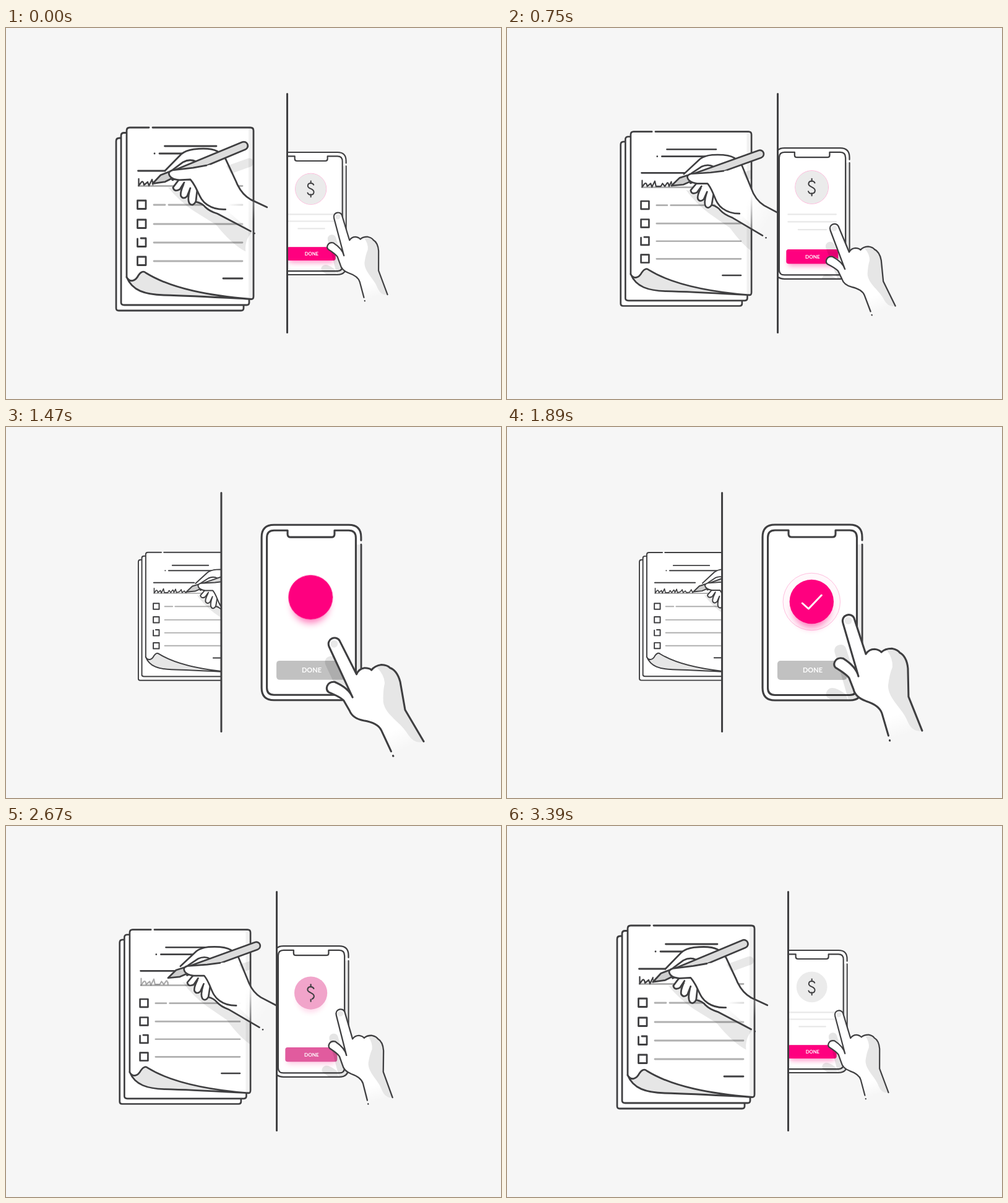
Recreate the animation shown at these times as an HTML page. Size 800x600 px, loop 3420 ms.

```html
<!DOCTYPE html>
<html lang="en">
<head>
<meta charset="utf-8">
<title>Paper form and mobile form</title>
<style>
  html, body { margin: 0; width: 100%; height: 100%; overflow: hidden; background: #f6f6f6; }
  svg { display: block; width: 800px; height: 600px; }
  .ink { fill: none; stroke: #3f3f41; stroke-width: 2.8; stroke-linecap: round; stroke-linejoin: round; }
  .white { fill: #fff; }
  .rule { fill: none; stroke: #b0b0b0; stroke-width: 2.8; stroke-linecap: round; }
  .pale { fill: none; stroke: #e8e8e8; stroke-width: 3; stroke-linecap: round; }
  .shade { fill: #e6e6e6; }
  .pink { fill: #ff007f; }
</style>
</head>
<body>
<svg viewBox="0 0 800 600">
  <defs>
    <clipPath id="leftSide"><rect id="leftRect" width="450" height="600"/></clipPath>
    <clipPath id="rightSide"><rect id="rightRect" width="800" height="600"/></clipPath>
    <clipPath id="pageClip"><rect x="195" y="161" width="205" height="278"/></clipPath>
    <clipPath id="phoneClip"><rect x="413" y="158" width="161" height="284" rx="20"/></clipPath>
    <clipPath id="writtenClip"><rect id="written" x="205" y="230" height="40"/></clipPath>
    <linearGradient id="armFade" gradientUnits="userSpaceOnUse" x1="362" y1="280" x2="404" y2="304">
      <stop offset="0" stop-color="#fff"/><stop offset="1" stop-color="#fff" stop-opacity="0"/>
    </linearGradient>
    <linearGradient id="wristFade" gradientUnits="userSpaceOnUse" x1="630" y1="465" x2="641" y2="498">
      <stop offset="0" stop-color="#fff"/><stop offset="1" stop-color="#fff" stop-opacity="0"/>
    </linearGradient>
    <filter id="blur" x="-50%" y="-100%" width="200%" height="300%"><feGaussianBlur stdDeviation="6"/></filter>
    <path id="handShape" d="M568 403 L543 317 C539 303 557 299 561 309 L580 367 Q585 359 594 359 Q602 360 605 364 Q611 358 622 358
      Q632 360 635 365 Q646 371 648 390 L649 436 L671 491 L618 507 L606 463 Q602 450 580 443 Q563 437 560 424 L553 406
      Q549 400 531 389 Q527 385 530 379 Q534 372 543 374 Q552 377 561 384Z"/>
  </defs>

  <g clip-path="url(#leftSide)"><g id="paper">
    <path class="ink white" d="M384 449 V453 Q384 457 380 457 H182 Q178 457 178 453 V183 Q178 178 183 178 H188"/>
    <path class="ink white" d="M393 439 V444 Q393 448 389 448 H191 Q186 448 186 444 V174 Q186 169.500 191 169.500 H195"/>
    <path class="white" d="M195 403 V166 Q195 161 200 161 H395 Q400 161 400 166 V438.500 Q270 436 220 393Z"/>
    <path fill="#f1f1f1" d="M392 162 H396 Q400 162 400 166 V437 H392Z"/>
    <path class="ink" d="M231 161 H200 Q195 161 195 166 V403 M237 161 H395 Q400 161 400 166 V434 Q400 439 396 438.500"/>
    <path class="ink shade" d="M195 403 C200 412 209 410 214 400 Q220 391 226 396 C268 422 330 433 396 438.500
      C350 436 300 433 255 432 C225 431 204 425 195 403Z"/>
    <path class="ink" d="M256.500 191 H340 M240 203 h.1 M248 203 H357 M213.500 231 H307 M351 405 H382"/>
    <path class="rule" d="M214 255.500 H382 M239 286 H257 M263 286 H382 M239 317 H382 M239 347 H382 M239 377 H382"/>
    <path class="ink" stroke-linejoin="miter" d="M212.500 279 h13.500 v13.500 h-13.500z M212.500 310 h13.500 v13.500 h-13.500z
      M218 340 H226 V353.500 H212.500 V341 M212.500 370 h13.500 v13.500 h-13.500z"/>
    <g clip-path="url(#writtenClip)"><path id="signature" class="ink" style="stroke-width:2.3" d="M214.500 244 V255 L219 249 Q222 247 223 254
      L229 249 L231 255 L236 245 L238 254 H246 L249 249 L253 254 L257 248 Q259 247 260 254 L264 246 L266 254 L273 252
      L277 247 L279 254 L284 250 L287 254 L294 253 L298 247 L301 254 L306 249 L308 254 L314 251 L320 254"/></g>

    <g clip-path="url(#pageClip)"><g class="writer" opacity=".09">
      <path d="M262 258 Q280 280 304 296 L340 318 Q366 350 388 361 Q386 342 398 330 L330 270Z"/>
      <path d="M330 240 L393 217" stroke="#000" stroke-width="14" stroke-linecap="round"/>
    </g></g>
    <g class="writer">
      <path fill="url(#armFade)" d="M257 231 L283 204 Q290 198 303 196 Q330 193 340 199 L372 248 Q380 268 396 277 L422 289
        L402 331 L342 300 Q318 292 307 270 L282 248 L264 243Z"/>
      <path class="ink white" d="M309 263 L307 281 Q302 289 297 284 Q293 279 297 262"/>
      <path class="ink white" d="M298 259 L293 272 Q287 278 283 272 Q281 267 287 253"/>
      <path class="ink white" d="M288 250 L281 261 Q272 266 270 258 L279 246"/>
      <path class="ink" d="M257 231 L283 204 Q290 198 303 196 Q330 193 341 199 Q349 204 355 212 L372 248 Q380 268 396 277 L422 289
        M270 229 L286 217 Q297 211 307 216 M307 281 Q317 283 322 289 Q329 296 342 300 L396 328 M402 331.500 h.1"/>
      <path class="ink" fill="#c9c9c9" style="fill:#cecece" d="M237 252 L250 238 L263 233 L269 243 L257 249Z"/>
      <path class="ink" style="fill:#dcdcdc" d="M263 234 L381.500 184 A6.500 6.500 0 0 1 386.500 196 L269 246Z"/>
      <path class="white" d="M268 244 Q258 234 268 230 L303 226 L330 221 L340 270 L318 275 L298 246Z"/>
      <path class="ink" d="M324 222 L302 226 L269 230 Q260 233 265 240 Q269 245 280 246 L298 245
        C311 259 311 277 326 286 Q338 294 355 293"/>
    </g>
  </g></g>

  <g clip-path="url(#rightSide)"><g id="phone">
    <path class="ink white" style="stroke-width:3.1" d="M574 190 V422 Q574 442 554 442 H433 Q413 442 413 422 V178 Q413 158 433 158 H554 Q574 158 574 178 V183"/>
    <rect x="567" y="190" width="5.500" height="235" fill="#ebebeb"/>
    <path class="ink white" style="stroke-width:3.1" d="M455 167 H433 Q421.500 167 421.500 179 V422 Q421.500 433.500 433 433.500 H554 Q565.500 433.500 565.500 422
      V179 Q565.500 167 554 167 H531 V173 Q531 178 526 178 H460 Q455 178 455 173Z"/>
    <g id="copy">
      <path class="pale" pathLength="1" d="M441 302 H545"/>
      <path class="pale" pathLength="1" d="M441 318 H545"/>
      <path class="pale" pathLength="1" d="M463 335 H524"/>
    </g>

    <g id="badge">
      <circle id="ring" class="pink" fill-opacity=".05" stroke="#ff007f" stroke-opacity=".45"/>
      <circle r="35.700" fill="#ebebeb"/>
      <g id="pinkBadge">
        <circle class="pink" cy="12" r="30" filter="url(#blur)" opacity=".5"/>
        <circle class="pink" r="35.700"/>
      </g>
      <g id="dollar">
        <path class="ink" pathLength="1" d="M6.500 -9.500 C4 -15 -7 -15 -7 -7 C-7 0 7 -1 7 7 C7 15 -5 16 -7.500 9"/>
        <path class="ink" pathLength="1" d="M0 -18.500 V-13"/>
        <path class="ink" pathLength="1" d="M0 18.500 V13"/>
      </g>
      <g id="check"><path class="ink" pathLength="1" style="stroke:#fff;stroke-width:3" d="M-15 2.500 L-5 11.500 L16 -10.500"/></g>
    </g>

    <rect x="437" y="378" width="112.500" height="31" rx="5" fill="#c1c1c1"/>
    <g id="pinkButton">
      <rect class="pink" x="441" y="390" width="104" height="24" rx="5" filter="url(#blur)" opacity=".4"/>
      <rect class="pink" x="437" y="378" width="112.500" height="31" rx="5"/>
    </g>
    <text x="494" y="397.500" text-anchor="middle" fill="#fff" font-family="Lato, sans-serif" font-weight="700" font-size="11">DONE</text>

    <g clip-path="url(#phoneClip)"><g id="tapShadow" opacity=".1"><use href="#handShape"/></g></g>
    <g id="tapper">
      <use href="#handShape" fill="url(#wristFade)"/>
      <path class="shade" d="M614 361 Q627 356 635 365 Q646 371 648 390 L649 436 L671 491 Q656 494 648 477 C640 455 616 440 616 418 Q618 400 623 388 Q624 374 614 361Z"/>
      <circle cx="551.500" cy="313" r="6" fill="#e9e9e9"/>
      <path class="ink" style="stroke-width:3.100" d="M568 403 L543 317 C539 303 557 299 561 309 L580 367 Q585 359 594 359 Q602 360 605 364 Q611 358 622 358
        Q632 360 635 365 Q646 371 648 390 L649 436 L671 491 M568 403 Q564 387 543 374 Q534 372 530 379 Q527 385 531 389
        Q549 400 553 406 L560 424 Q563 437 580 443 Q602 450 606 463 L616.500 499 M618.500 506.500 l.2 .6"/>
    </g>
  </g></g>
  <line id="divider" class="ink" style="stroke-width:3" y1="106.500" y2="492.500"/>
</svg>

<script>
const LOOP = 3420, HALF = LOOP / 2;
const $ = id => document.getElementById(id);
const set = (id, name, value) => $(id).setAttribute(name, value);
const linear = u => u;
const smooth = u => u * u * (3 - 2 * u);
const writers = document.querySelectorAll('.writer');

// Value at time t from a flat list of time, value pairs.
function track(t, keys, ease = smooth) {
  if (t <= keys[0]) return keys[1];
  for (let i = 2; i < keys.length; i += 2) {
    if (t < keys[i]) {
      const u = (t - keys[i - 2]) / (keys[i] - keys[i - 2]);
      return keys[i - 1] + (keys[i + 1] - keys[i - 1]) * ease(u);
    }
  }
  return keys[keys.length - 1];
}

// Closed form of cubic-bezier(1, 0, 0, 1).
function sharpEase(x) {
  const k = 2 * x - 1;
  return 0.5 + 0.75 * Math.cbrt(k) - 0.25 * k;
}

function trim(id, amount) {
  for (const path of $(id).children) {
    path.style.strokeDasharray = `${amount} 2`;
    path.style.opacity = amount > 0.005 ? 1 : 0;
  }
}

function zoom(id, cx, scale) {
  set(id, 'transform', `translate(${cx} 300) scale(${scale}) translate(${-cx} -300)`);
}

function moveSplit(t) {
  const p = t < HALF ? sharpEase(t / HALF) : 1 - sharpEase((t - HALF) / HALF);
  const x = 454.5 - 107.4 * p;
  set('leftRect', 'width', x);
  set('rightRect', 'x', x);
  set('divider', 'x1', x);
  set('divider', 'x2', x);
  zoom('paper', 297.5, 1 - 0.303 * p);
  zoom('phone', 493.5, 0.697 + 0.304 * p);
}

function write(t) {
  const phase = (t - 2880 + LOOP) % LOOP;
  const back = smooth(Math.max(0, (phase - 2960) / 460));
  const u = Math.min(1, phase / 2960) ** 0.9 * (1 - back);
  const x = 214 + 106 * u;
  const y = 252 + 1.2 * Math.sin(u * 45) - 10 * Math.sin(Math.PI * back);
  const angle = -3.8 + 23 * u - 17.5 * u * u;
  for (const g of writers)
    g.setAttribute('transform', `translate(${x} ${y}) rotate(${angle}) translate(-237 -252)`);
  set('written', 'width', x - 204);
  set('signature', 'opacity', 1 - back);
}

function tap(t) {
  const q = track(t, [0, .04, 540, .2, 750, .33, 1080, .85, 1170, 1, 1230, 1, 1420, .62,
    1620, .33, 1890, .107, 2160, .05, 2400, .015, 2940, 0, LOOP, .04], linear);
  const x = 556 - 51.5 * q, y = 294 + 86 * q, lift = 1 - q;
  const pose = `rotate(${-19.7 * (q - 0.107)}) translate(-550.5 -303)`;
  set('tapper', 'transform', `translate(${x} ${y}) ${pose}`);
  set('tapShadow', 'transform', `translate(${x + 2 - 17 * lift} ${y + 10 + 43 * lift}) ${pose}`);
}

function updateScreen(t) {
  set('badge', 'transform', `translate(492.3 ${track(t, [1230, 243, 1560, 282.5, 2450, 282.5, 2850, 243])})`);
  set('pinkBadge', 'opacity', track(t, [1230, 0, 1480, 1, 2440, 1, 2800, 0]));
  set('pinkButton', 'opacity', track(t, [1210, 1, 1380, 0, 2480, 0, 2850, 1]));
  trim('dollar', track(t, [1200, 1, 1420, 0, 2360, 0, 2800, 1]));
  trim('check', track(t, [1500, 0, 1780, 1, 2420, 1, 2680, 0]));
  trim('copy', track(t, [1200, 1, 1450, 0, 2850, 0, 3300, 1]));
  const pulse = track(t, [1680, 0, 2160, 1], linear);
  set('ring', 'r', 36 + 15 * (1 - (1 - pulse) ** 2));
  set('ring', 'opacity', 1 - pulse);
}

function draw(now) {
  const t = now % LOOP;
  moveSplit(t);
  write(t);
  tap(t);
  updateScreen(t);
}

let start;
function tick(now) {
  start ??= now;
  draw(now - start);
  requestAnimationFrame(tick);
}
draw(0);
requestAnimationFrame(tick);
</script>
</body>
</html>
```
